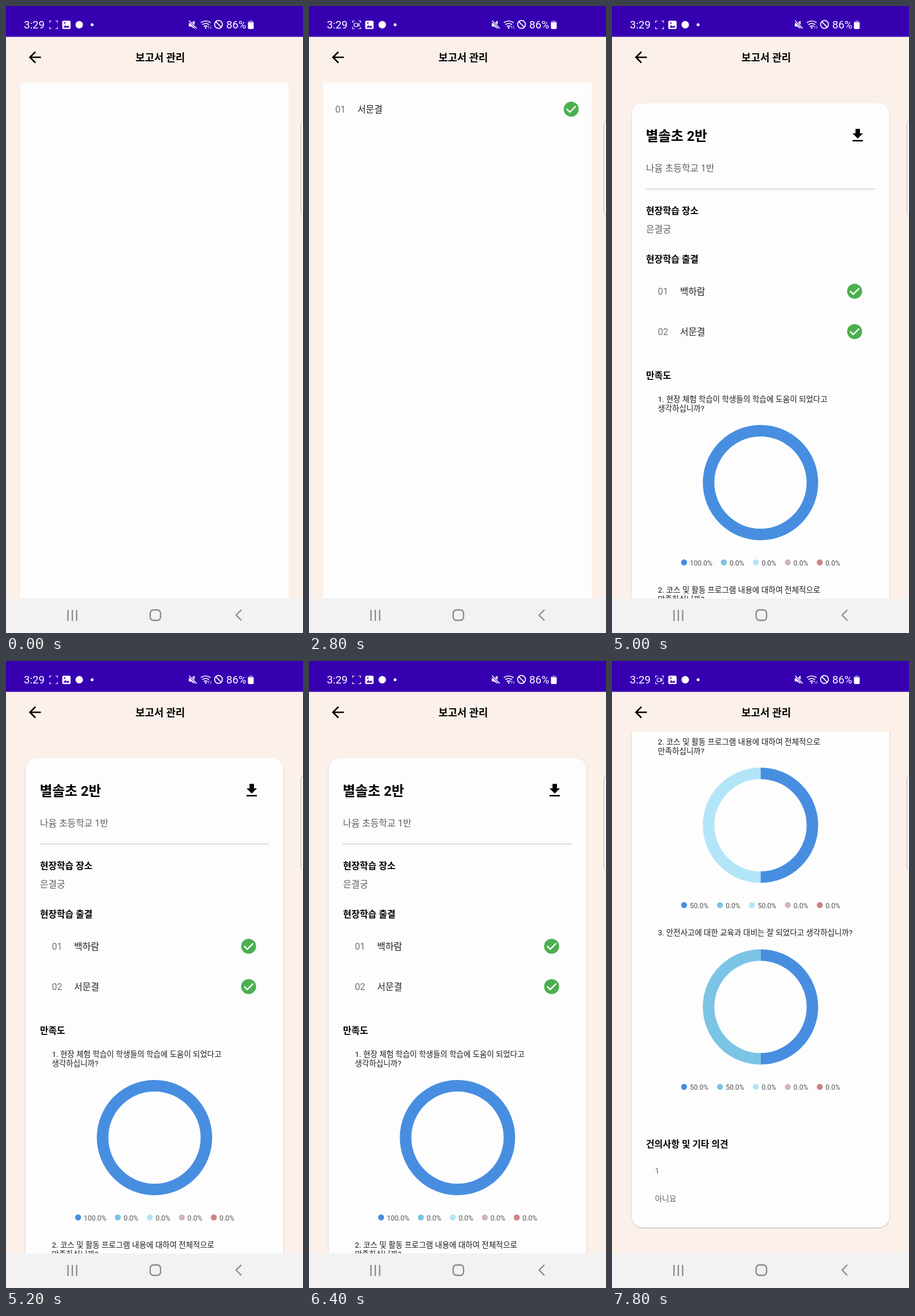
Animation, 515 px wide and 1088 px high, one loop 8 s. Source, as an HTML page:

```html
<!DOCTYPE html>
<html lang="ko">
<head>
<meta charset="utf-8">
<title>보고서 관리</title>
<style>
  html, body { margin: 0; width: 100%; height: 100%; overflow: hidden; background: #fbf1ea; }
  #stage { display: block; }
  text { font-family: Roboto, "Noto Sans CJK KR", "Noto Sans CJK", sans-serif; white-space: pre; }
  .line { fill: none; stroke-linecap: round; stroke-linejoin: round; }
</style>
</head>
<body>
<svg id="stage" width="515" height="1088" viewBox="0 0 515 1088"></svg>
<script>
const LOOP = 8000, SCROLL = 873;
const COLORS = ['#488ee0', '#7cc4e5', '#b3e5f9', '#d0b5b6', '#cb8486'];
const stage = document.getElementById('stage');

// Text placed by its left edge and vertical centre
const label = (x, cy, size, str, fill = '#000', weight = 400, extra = '') =>
  `<text x="${x}" y="${cy + size * 0.37}" font-size="${size}" fill="${fill}" font-weight="${weight}" ${extra}>${str}</text>`;

const row = (id, x, cy, num, name, checkX) => `
  <g id="${id}">
    ${label(x, cy, 16, num, '#757575')}
    ${label(x + 38.5, cy, 15.8, name, '#222')}
    <circle cx="${checkX}" cy="${cy}" r="13" fill="#4caf50"/>
    <path fill="none" stroke="#fff" stroke-width="2.5" d="M${checkX - 7.8} ${cy - .3}l5.4 5.4 10.3-10.3"/>
  </g>`;

// Ring segments: [colour index, start %, length %]
const ring = (id, cy, parts) => `
  <g id="${id}">${parts.map(([c, from, len]) => `
    <circle cx="257.5" cy="${cy}" r="90" fill="none" stroke="${COLORS[c]}" stroke-width="20" pathLength="100"
      stroke-dasharray="${len} 200" transform="rotate(${from * 3.6 - 90} 257.5 ${cy})"/>`).join('')}
  </g>`;

const legend = (cy, values) => `
  <g class="legend">${values.map((v, i) =>
    `<circle cy="${cy - .5}" r="5.2" fill="${COLORS[i]}"/>` + label(0, cy + .5, 12, v + '.0%', '#555')).join('')}
  </g>`;

const question = (cy, lines) => lines.map((s, i) => label(79.5, cy + i * 16, 13.45, s, '#1c1c1c')).join('');
const heading = (cy, s) => label(59, cy, 15.8, s, '#000', 700);

const report = `
  <rect x="34" y="168.5" width="447" height="1687.5" rx="20" fill="#fdfdfd" filter="url(#cardShadow)"/>
  ${label(58.5, 225, 23.7, '별솔초 2반', '#000', 700)}
  <path transform="translate(410.6 209.3) scale(1.29)" d="M19 9h-4V3H9v6H5l7 7 7-7zM5 18v2h14v-2H5z"/>
  ${label(59, 281, 15.8, '나윰 초등학교 1반', '#606060')}
  <path d="M58.5 317.5H456" stroke="#d0d0d0" stroke-width="1.3"/>
  ${heading(355, '현장학습 장소')}
  ${label(59, 387, 15.8, '은결궁', '#606060')}
  ${heading(439, '현장학습 출결')}
  <g id="rows">
    ${row('r1', 79.5, 495, '01', '백하람', 420.7)}
    ${row('r2', 79.5, 565, '02', '서문결', 420.7)}
  </g>
  ${heading(641.5, '만족도')}
  ${question(682, ['1. 현장 체험 학습이 학생들의 학습에 도움이 되었다고', '생각하십니까?'])}
  ${ring('ring1', 827, [[0, 0, 100]])}
  ${legend(966, [100, 0, 0, 0, 0])}
  ${question(1013, ['2. 코스 및 활동 프로그램 내용에 대하여 전체적으로', '만족하십니까?'])}
  ${ring('ring2', 1158, [[0, 0, 50], [2, 50, 50]])}
  ${legend(1297, [50, 0, 50, 0, 0])}
  ${question(1344, ['3. 안전사고에 대한 교육과 대비는 잘 되었다고 생각하십니까?'])}
  ${ring('ring3', 1473.3, [[0, 0, 50], [1, 50, 50]])}
  ${legend(1612.5, [50, 50, 0, 0, 0])}
  ${heading(1711.5, '건의사항 및 기타 의견')}
  ${label(74.5, 1757, 13.45, '1', '#606060')}
  ${label(74.5, 1806, 13.45, '아니요', '#606060')}`;

const statusIcons = `
  ${label(31, 32, 18.6, '3:29', '#fff')}
  <g class="line" stroke="#fff" stroke-width="1.2">
    <path d="M75.6 28.6v-2.6h3M86.400 26h3v2.600M89.400 36.900v2.600h-3M78.600 39.500h-3v-2.600"/>
    <g id="rec"><rect x="78.300" y="30" width="6" height="5.600" rx="1"/><path d="M84.500 32l2.500-1.500v4.500l-2.500-1.500"/></g>
  </g>
  <rect x="97.5" y="25.5" width="14.5" height="14.5" rx="2.5" fill="#fff"/>
  <path d="M99.5 37.5l3.300-4.500 2.400 2.800 2.300-2 2.700 3.700z" fill="#3600b1"/>
  <circle cx="102" cy="29.5" r="1.3" fill="#3600b1"/>
  <circle cx="127" cy="32.5" r="6.5" fill="#fff"/>
  <circle cx="149.3" cy="32.5" r="2.5" fill="#fff"/>
  <path d="M317 29.5h4l6-4v14l-6-4h-4z" fill="#fff"/>
  <path d="M317.5 25.5l13.5 14" stroke="#3600b1" stroke-width="3.5"/>
  <path d="M317.5 25.5l13 13.5" stroke="#fff" stroke-width="1.7"/>
  <g class="line" stroke="#fff" stroke-width="1.7">
    <path d="M338.5 28.5q7.5-5 15.5 0M341 32q5.3-3.5 10.5 0M343.5 35.3q2.7-1.8 5.4 0"/>
    <circle cx="368.5" cy="32" r="6.8"/><path d="M363.7 27.2l9.6 9.6"/>
  </g>
  <circle cx="346.2" cy="37.8" r="1.5" fill="#fff"/>
  <path class="line" d="M351.5 39v-4.5m-1.3 1.3l1.3-1.3 1.3 1.3M355 34.5v4.5m-1.3-1.3l1.3 1.3 1.3-1.3" stroke="#a58fdc"/>
  ${label(382, 32, 18.6, '86%', '#fff')}
  <path d="M422.5 25h4v1.5h2.5v3h-9.5v-3h3z" fill="#8d72d2"/>
  <path d="M419.5 28.5h10v9.5q0 2-2 2h-6q-2 0-2-2z" fill="#fff"/>`;

const navIcons = `
  <g id="nav" fill="none" stroke-width="2.3">
    <path d="M107.5 1048v19M115 1048v19M122.5 1048v19"/>
    <rect x="250" y="1048" width="18" height="18" rx="5.5"/>
    <path class="line" d="M407.5 1048.5l-8.5 8.5 8.5 8.5"/>
  </g>`;

const dialog = `
  <g id="dialog">
    <rect x="43.5" y="451" width="428" height="179.5" rx="5" fill="#fff" filter="url(#dialogShadow)"/>
    ${label(73.5, 485, 15.8, '체험학습 종료', '#222')}
    ${label(73.5, 515.5, 13.8, '보고서를 저장하고 체험학습을 종료하시겠습니까?', '#606060')}
    ${label(318.5, 598, 13.45, '취소', '#3a1fa5', 500, 'letter-spacing="1"')}
    ${label(408, 598, 13.45, '확인', '#3a1fa5', 500, 'letter-spacing="1"')}
  </g>`;

stage.innerHTML = `
  <defs>
    <filter id="cardShadow" filterUnits="userSpaceOnUse" x="20" y="150" width="475" height="1730">
      <feDropShadow dx="0" dy="1" stdDeviation="1.3" flood-opacity=".27"/>
    </filter>
    <filter id="dialogShadow" x="-15%" y="-30%" width="130%" height="170%">
      <feDropShadow dx="0" dy="9" stdDeviation="11" flood-opacity=".38"/>
    </filter>
    <clipPath id="viewport"><rect y="123" width="515" height="905"/></clipPath>
  </defs>
  <rect width="515" height="1088" fill="#fbf1ea"/>
  <g id="listPage">
    <rect x="25" y="133.5" width="465" height="895" fill="#fdfdfd"/>
    ${row('listRow', 45.5, 179, '01', '서문결', 454.7)}
  </g>
  <g id="reportPage" clip-path="url(#viewport)"><g id="content">${report}</g></g>
  <rect width="515" height="53.5" fill="#3600b1"/>
  <path d="M60.5 89H42M51 79.5l-9.5 9.5 9.5 9.5" fill="none" stroke="#000" stroke-width="2.6"/>
  ${label(224.5, 89.5, 17.7, '보고서 관리', '#000', 700)}
  <rect y="1028" width="515" height="60" fill="#f2f2f3"/>
  <rect id="scrim" width="515" height="1088" fill="#000"/>
  <rect x="511.5" y="199.5" width="12" height="163" rx="5" fill="#fff" fill-opacity=".5" stroke="#b9aaa4"/>
  ${statusIcons}${navIcons}${dialog}`;

const $ = id => document.getElementById(id);
const clamp = x => Math.min(1, Math.max(0, x));
const span = (t, start, length) => clamp((t - start) / length);
const easeOut = x => 1 - (1 - x) ** 2;
const easeInOut = x => x < .5 ? 4 * x ** 3 : 1 - (2 - 2 * x) ** 3 / 2;
const show = (id, on) => $(id).setAttribute('display', on ? 'inline' : 'none');

// Legend entries flow from left to right
function layLegends() {
  document.querySelectorAll('.legend').forEach(g => {
    let x = 120;
    for (let i = 0; i < g.children.length; i += 2) {
      const dot = g.children[i], text = g.children[i + 1];
      dot.setAttribute('cx', x + 5);
      text.setAttribute('x', x + 15);
      x += 30 + text.getComputedTextLength();
    }
  });
}

// Fade in while rising the last 25 px
function rise(id, t, start) {
  const a = easeOut(span(t, start, 350));
  $(id).setAttribute('opacity', a);
  $(id).setAttribute('transform', `translate(0 ${25 * (1 - a)})`);
}

function draw(t) {
  const inReport = t >= 3000;
  show('rec', t % 1000 >= 500);
  show('listPage', !inReport);
  show('reportPage', inReport);
  rise('listRow', t, 400);
  rise('rows', t, 3187);
  rise('ring1', t, 3285);
  $('ring1').firstElementChild.setAttribute('stroke-dasharray', `${100 * span(t, 3050, 545)} 200`);

  const scroll = SCROLL * easeInOut(span(t, 6500, 700));
  $('content').setAttribute('transform', `translate(0 ${-scroll})`);

  const open = span(t, 5400, 180) * (1 - span(t, 6130, 180));
  $('scrim').setAttribute('opacity', .33 * open);
  $('dialog').setAttribute('opacity', open);
  show('dialog', open > 0);
  const grey = Math.round(138 + 94 * open);
  $('nav').setAttribute('stroke', `rgb(${grey},${grey},${grey})`);
}

function tick() {
  draw(performance.now() % LOOP);
  requestAnimationFrame(tick);
}

layLegends();
tick();
</script>
</body>
</html>
```
